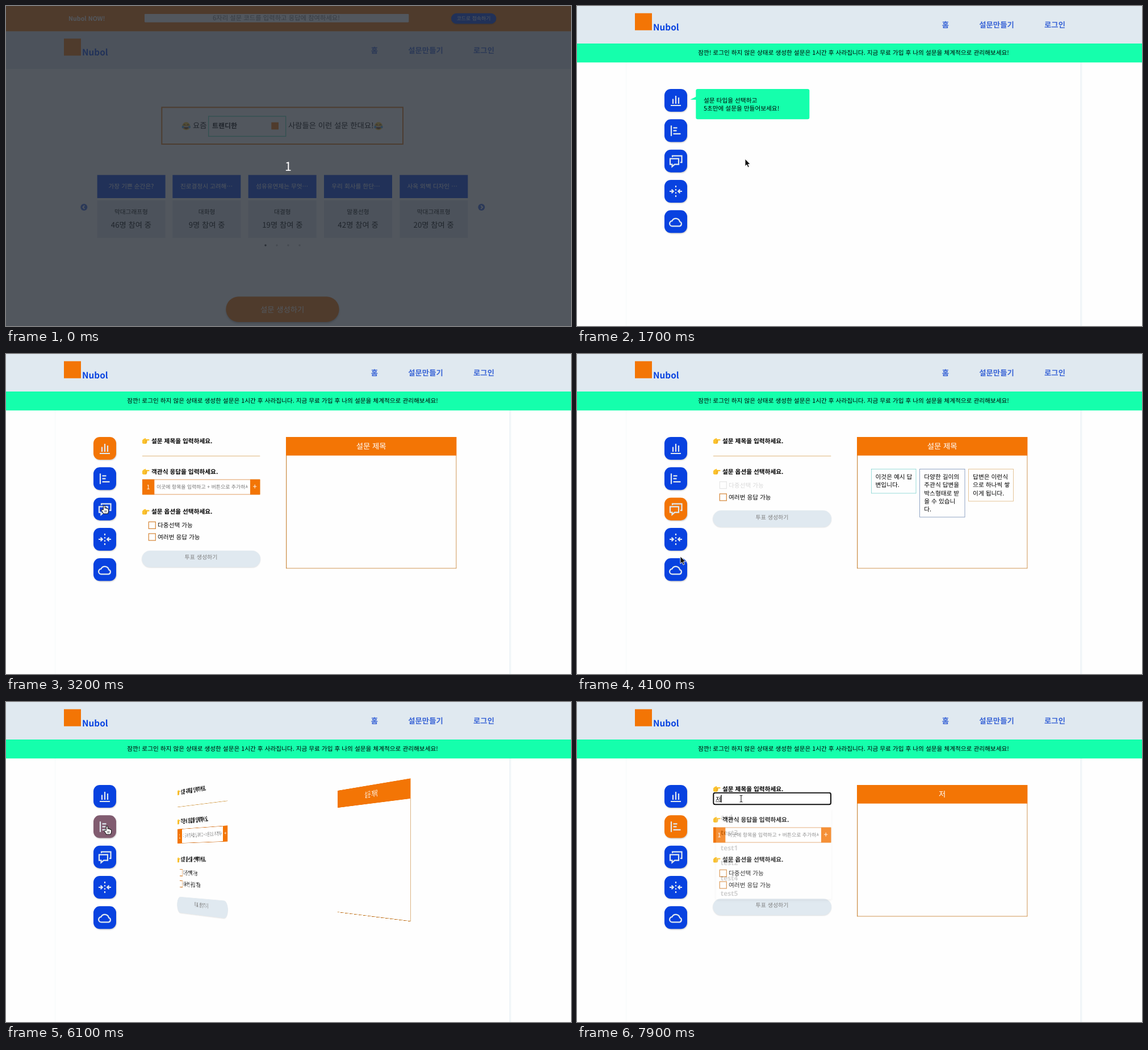
An HTML page that plays this animation: 995 by 563 pixels, repeating every 8000 ms.

```html
<!DOCTYPE html>
<html lang="ko">
<head>
<meta charset="utf-8">
<title>설문 만들기</title>
<style>
html, body { margin: 0; width: 100%; height: 100%; overflow: hidden; background: #fefefe; }
/* The page is laid out at 1.5 times the stage and scaled down, as in a scaled screen recording. */
#stage { position: relative; width: 1492.5px; height: 844.5px; overflow: hidden; background: #fefefe;
  transform: scale(.666667); transform-origin: 0 0; text-rendering: geometricPrecision;
  font-family: 'Noto Sans CJK KR', 'Noto Sans CJK', 'Noto Sans', sans-serif; color: #000; }
#stage div, #stage svg { position: absolute; box-sizing: border-box; }
#stage svg { overflow: visible; }
.t { white-space: pre; line-height: 30px; }
.page { left: 0; top: 0; width: 1492.5px; height: 844.5px; }
.flip { transform-origin: 50% 417px; backface-visibility: hidden; }
</style>
</head>
<body>
<div id="stage"></div>
<script>
const ORANGE = '#f37505', BLUE = '#0842e0', PALE = '#e0e9f0', GREEN = '#15ffac', LINE = '#b96400';
const BRAND = 'Nubol';
const K = 1.5;
const stage = document.getElementById('stage');

// Helpers take stage pixels; css strings are in layout pixels.
function box(parent, x, y, w, h, css = '') {
  const d = document.createElement('div');
  d.style.cssText = `left:${x * K}px;top:${y * K}px;width:${w * K}px;height:${h * K}px;${css}`;
  parent.appendChild(d);
  return d;
}
// Text centred vertically on cy; x is the left edge, or the middle when centred.
function text(parent, str, x, cy, size, css = '', centred = false) {
  const d = document.createElement('div');
  d.className = 't';
  d.textContent = str;
  const place = centred ? `left:${(x - 300) * K}px;width:${600 * K}px;text-align:center;` : `left:${x * K}px;`;
  d.style.cssText = `${place}top:${(cy - 10.5) * K}px;font-size:${size}px;${css}`;
  parent.appendChild(d);
  return d;
}
const mid = (p, s, x, y, size, css) => text(p, s, x, y, size, css, true);

function page(parent, css = '') {
  const d = document.createElement('div');
  d.className = 'page';
  d.style.cssText = css;
  parent.appendChild(d);
  return d;
}
function svg(parent, x, y, w, h, body) {
  const d = box(parent, x, y, w, h);
  d.innerHTML = `<svg width="${w * K}" height="${h * K}" viewBox="0 0 ${w} ${h}">${body}</svg>`;
  return d;
}
const show = (node, on) => { node.style.display = on ? '' : 'none'; };

const S = 16, M = 20;

function header(parent, y) {
  const h = box(parent, 0, y, 995, 66.6, `background:${PALE}`);
  box(h, 102, 13, 30, 30, `background:${ORANGE}`);
  text(h, BRAND, 134, 37, 23, `font-weight:700;color:${BLUE}`);
  const nav = [['홈', 649], ['설문만들기', 739], ['로그인', 841.5]];
  for (const [s, x] of nav) mid(h, s, x, 33.6, M, 'font-weight:600;color:#3a65d6');
}

const LAUGH = `<circle cx="8" cy="8" r="7" fill="#fcc832"/>
  <path d="M3 8.2H13A5 5 0 0 1 3 8.2Z" fill="#6b3a20"/><path d="M3.8 8.4H12.2V9.8H3.8Z" fill="#fff"/>
  <path d="M3.2 6.2L5.2 4.8L6.6 6.4M9.4 6.4L10.8 4.8L12.8 6.2" fill="none" stroke="#6b3a20"/>
  <ellipse cx="2.2" cy="9.6" rx="1.9" ry="2.4" fill="#4cacea"/><ellipse cx="13.8" cy="9.6" rx="1.9" ry="2.4" fill="#4cacea"/>`;
const POINT = `<path d="M0 4.5Q2 1.5 5 .8Q7 .6 6.2 2.6H12Q13.4 3.6 12 4.9H8.2Q9.4 6 8.3 7Q9 8.2 7.8 8.8Q8 10.6 6 10.6H3Q1 10.6 0 9.4Z" fill="#fbc22e"/>
  <path d="M5.4 4.9H8.2M5.6 7H8.2M5.4 8.9H7.6" stroke="#d8901c" stroke-width=".7"/>`;

// ---- Home page
const home = page(stage);
box(home, 0, 0, 995, 44.4, `background:${ORANGE}`);
text(home, BRAND + ' NOW!', 110, 21.5, S, 'font-weight:600;color:#fff');
box(home, 244, 14.2, 465, 14.8, 'background:#fff;border-radius:2px');
mid(home, '6자리 설문 코드를 입력하고 응답에 참여하세요!', 476, 21, 17, 'color:#757575');
box(home, 784, 12.5, 79, 19, `background:${BLUE};border-radius:15px;box-shadow:0 2px 3px #0004`);
mid(home, '코드로 접속하기', 823.5, 22, 13.33, 'color:#fff');
header(home, 44.4);

box(home, 273.6, 177.6, 426.4, 66.6, 'border:3px solid #e07d1c');
for (const x of [309.5, 648]) svg(home, x, 203, 16, 16, LAUGH);
text(home, '요즘', 329, 210.5, M);
box(home, 356.3, 193, 137.2, 37, 'border:2px solid #5fe3bd;background:#fff');
text(home, '트랜디한', 363, 211, 18, 'font-weight:600');
box(home, 467.5, 204.5, 12.5, 12.5, `background:${ORANGE}`);
text(home, '사람들은 이런 설문 한대요!', 497, 210.5, M);

const cards = [
  ['가장 기쁜 순간은?', '막대그래프형', 46], ['진로결정시 고려해…', '대화형', 9],
  ['섬유유연제는 무엇…', '대결형', 19], ['우리 회사를 한단…', '말풍선형', 42],
  ['사옥 외벽 디자인 …', '막대그래프형', 20]];
cards.forEach(([title, kind, n], i) => {
  const x = 160.4 + 133.2 * i;
  box(home, x, 297.2, 120, 40.8, `background:${BLUE}`);
  box(home, x, 341.8, 120, 66, `background:${PALE}`);
  if (i) text(home, title, x + 13.3, 317, S, 'color:#fff');
  else mid(home, title, x + 60, 317, S, 'color:#fff');
  mid(home, kind, x + 60, 361.5, S);
  mid(home, n + '명 참여 중', x + 60, 385, M);
});
[[137, -1], [837, 1]].forEach(([x, d]) => svg(home, x - 6, 348, 12, 12,
  `<circle cx="6" cy="6" r="6" fill="#3d68e0"/><path d="M${6 - d} 3L${6 + 2 * d} 6L${6 - d} 9" fill="none" stroke="#fff" stroke-width="1.8"/>`));
for (let i = 0; i < 4; i++)
  box(home, 455.2 + 20 * i, 419.3, 3.6, 3.6, `border-radius:50%;background:${i ? '#bdbdbd' : '#333'}`);
box(home, 387, 511.3, 199.6, 44.8, `background:${ORANGE};border-radius:34px;box-shadow:0 3px 4px #0004`);
mid(home, '설문 생성하기', 486.7, 533.5, M, 'color:#fff');

const shade = page(home, 'background:rgba(39,45,54,.8)');
mid(shade, '1', 497, 282, 32, 'color:#fff');

// ---- Maker page
const maker = page(stage);
box(maker, 87, 60, 799.5, 530, 'background:#fefefe;box-shadow:2px 0 6px #cfe0e8');
header(maker, -.4);
box(maker, 0, 66.2, 995, 33, `background:${GREEN}`);
mid(maker, '잠깐! 로그인 하지 않은 상태로 생성한 설문은 1시간 후 사라집니다. 지금 무료 가입 후 나의 설문을 체계적으로 관리해보세요!', 487, 82, S);

const glyphs = [
  'M11 29H29M15 26V17.5M20 26V12M25 26V15',
  'M12 11V29.5M15.5 15H22.5M15.5 20H21.5M15.5 25.5H28.5',
  'M12 16H25V26H18L13.5 30V26H10V16ZM14 13V11H30.5V22.5H28',
  'M20 10V13M20 16V18.5M20 21.5V24M20 27V30M9 20H15.5M12.6 16.8L15.8 20L12.6 23.2M31 20H24.5M27.4 16.8L24.2 20L27.4 23.2',
  'M14 28H26.5A4 4 0 0 0 27 20.2A7.2 7.2 0 0 0 13.4 18.8A4.6 4.6 0 0 0 14 28Z'];
const icons = glyphs.map((d, i) => {
  const b = box(maker, 154, 146 + 53.25 * i, 40, 40, 'border-radius:17px;box-shadow:1px 2px 3px #0003');
  svg(b, 0, 0, 40, 40, `<path d="${d}" fill="none" stroke="${PALE}" stroke-width="2.2"/>`);
  return b;
});

const tip = page(maker);
svg(tip, 199, 159, 11, 6, `<path d="M0 5.3L11 0V5.6Z" fill="${GREEN}"/>`);
box(tip, 209, 146, 200, 53, `background:${GREEN};border-radius:5px`);
text(tip, '설문 타입을 선택하고', 223, 165.5, S);
text(tip, '5초만에 설문을 만들어보세요!', 223, 179.7, S);

const form = box(maker, 240, 0, 207, 563);
const view = box(maker, 493.5, 0, 299.5, 563);
form.className = view.className = 'flip';

function label(parent, str, y) {
  svg(parent, 0, y - 5, 14, 11, POINT);
  text(parent, str, 16, y, S, 'font-weight:600');
}
function check(parent, str, y, off) {
  const css = off ? 'opacity:.15;' : '';
  box(parent, 10.6, y - 6.5, 13.4, 13.4, css + `border:2px solid ${off ? '#666' : '#d99048'}`);
  text(parent, str, 27, y, S, css);
}
function options(parent, y, single) {
  label(parent, '설문 옵션을 선택하세요.', y);
  check(parent, '다중선택 가능', y + 24.3, single);
  check(parent, '여러번 응답 가능', y + 45.3);
  box(parent, -1, y + 69.3, 209, 29, `background:${PALE};border-radius:22px;box-shadow:0 1px 3px #0002`);
  mid(parent, '투표 생성하기', 103.5, y + 82, 15, 'color:#808080');
}
label(form, '설문 제목을 입력하세요.', 152.3);
box(form, 0, 179, 207, 1, 'background:#cf953c');

const choice = page(form);
label(choice, '객관식 응답을 입력하세요.', 206.3);
box(choice, 0, 220.5, 207, 27, 'border:1px solid #d06a10;background:#fff');
box(choice, 0, 220.5, 21, 27, `background:${ORANGE}`);
box(choice, 190, 220.5, 17, 27, `background:${ORANGE}`);
mid(choice, '1', 10.5, 233.5, S, 'color:#fff');
mid(choice, '+', 198.3, 233, M, 'color:#fff');
const hint = box(choice, 25, 221.5, 161, 25, 'overflow:hidden');
text(hint, '이곳에 항목을 입력하고 + 버튼으로 추가하세요', 0, 12.2, 13.33, 'color:#757575');
options(choice, 276.7);

const free = page(form);
options(free, 206.3, true);

box(view, 0, 146, 299.5, 231.3, `border:1px solid ${LINE}`);
box(view, 0, 146, 299.5, 32.6, `background:${ORANGE}`);
const title = mid(view, '', 149.7, 161.5, M, 'color:#fff');
const notes = page(view);
[['이것은 예시 답|변입니다.', '#6accc8'],
 ['다양한 길이의|주관식 답변을|박스형태로 받|을 수 있습니|다.', '#5a78a8'],
 ['답변은 이런식|으로 하나씩 쌓|이게 됩니다.', '#d8a765']].forEach(([s, c], i) => {
  const lines = s.split('|'), x = 24.2 + 85.8 * i;
  box(notes, x, 202, 79.6, 15 + 14.1 * lines.length, `border:1px solid ${c}`);
  lines.forEach((l, k) => text(notes, l, x + 7.8, 216 + 14.1 * k, S));
});

// Focused title field with its suggestion list
const field = box(maker, 239, 158.8, 209, 22.4, 'background:#fff;border:3px solid #101010;border-radius:6px');
const typed = text(field, '', 3, 9.5, S, 'text-decoration:underline');
const caret = box(field, 3, 2.7, 1, 13, 'background:#000');
const list = box(maker, 244.5, 187, 203.5, 160, 'background:#fff;border-radius:4px;box-shadow:0 3px 7px #0004');
['asd', 'test3', 'test1', 'test2', 'test4', 'test5'].forEach((s, i) =>
  text(list, s, 8.5, 17 + 26.6 * i, 18, "font-family:'Noto Sans',sans-serif;font-weight:600;color:#222"));

// ---- Pointer
const shapes = {
  arrow: '<path d="M0 0V13L3 10.3L5 15L7.3 14L5.3 9.5H9.2Z" fill="#111" stroke="#fff" stroke-width=".9"/>',
  hand: '<path d="M-1.6 8V1.2Q-.2-.6 1.2 1.2V5Q3 4.2 3.6 5.6Q5.4 5 5.8 6.4Q7.6 6.2 7.6 8V11Q7 13 6.2 15H-1.4Q-2.4 12.5-5 9.5Q-5.4 7.4-3.4 8Z" fill="#fff" stroke="#111"/><path d="M1.2 9V12.5M3.4 9V12.5" stroke="#111" stroke-width=".8"/>',
  beam: '<path d="M-2.5-6Q0-6 0-4.5Q0-6 2.5-6M0-4.5V4.5M-2.5 6Q0 6 0 4.5Q0 6 2.5 6" fill="none" stroke="#222" stroke-width="1.1"/>'
};
const pointers = {};
for (const k in shapes) pointers[k] = svg(stage, 0, 0, 1, 1, shapes[k]);

const track = [
  [600, 557, 558, 'hand'], [900, 548, 542, 'hand'], [1100, 548, 542, 'hand'], [1200, 530, 520, 'arrow'],
  [1700, 296, 269, 'arrow'], [1900, 178, 168, 'hand'], [2800, 177, 165, 'hand'], [3200, 173, 266, 'hand'],
  [3800, 173, 266, 'hand'], [3900, 176, 298, 'arrow'], [4100, 182, 356, 'arrow'], [4300, 182, 365, 'hand'],
  [4400, 180, 367, 'hand'], [4500, 177, 370, 'hand'], [5000, 177, 370, 'hand'], [5100, 178, 349, 'arrow'],
  [5400, 176, 250, 'hand'], [5500, 176, 231, 'hand'], [5700, 178, 218, 'hand'], [6300, 178, 218, 'hand'],
  [6400, 214, 200, 'arrow'], [6600, 280, 173, 'beam'], [6800, 289, 170, 'beam'], [8000, 289, 170, 'beam']];

function movePointer(t) {
  let i = track.length - 1;
  while (i >= 0 && track[i][0] > t) i--;
  for (const k in pointers) show(pointers[k], i >= 0 && track[i][3] === k);
  if (i < 0) return;
  const [t0, x, y, kind] = track[i], [t1, x1, y1] = track[i + 1];
  const f = (t - t0) / (t1 - t0);
  pointers[kind].style.transform = `translate(${(x + (x1 - x) * f) * K}px,${(y + (y1 - y) * f) * K}px)`;
}

// CSS "ease" curve
function ease(p) {
  if (p <= 0) return 0;
  if (p >= 1) return 1;
  let lo = 0, hi = 1, u;
  for (let i = 0; i < 24; i++) {
    u = (lo + hi) / 2;
    const x = .75 * u * (1 - u) * (1 - u) + .75 * u * u * (1 - u) + u * u * u;
    if (x < p) lo = u; else hi = u;
  }
  return .3 * u * (1 - u) * (1 - u) + 3 * u * u * (1 - u) + u * u * u;
}
const mix = f => `rgb(${[8, 66, 224].map((c, i) => Math.round(c + ([243, 117, 5][i] - c) * f))})`;

function turn(node, k) {
  node.style.willChange = k < 1 ? 'transform' : 'auto';
  node.style.transform = k < 1 ? `perspective(2500px) rotateY(${100 * k - 100}deg)` : 'none';
}

// Shown at, animation start, selected icon
const picks = [[2000, 1950, 0], [3600, 3475, 2], [4700, 4645, 4], [6100, 6010, 1]];

function draw(t) {
  show(home, t < 1100);
  show(shade, t < 200);
  show(maker, t >= 1100);
  const pick = picks.filter(p => t >= p[0]).pop();
  show(tip, !pick);
  show(form, pick);
  show(view, pick);
  icons.forEach((b, i) => {
    b.style.background = pick && pick[2] === i ? mix(ease((t - pick[1]) / 300)) : BLUE;
  });
  if (pick) {
    const k = ease((t - pick[1]) / 400);
    turn(form, k);
    turn(view, k);
    show(choice, pick[2] < 2);
    show(free, pick[2] >= 2);
    show(notes, pick[2] === 2);
  }
  const word = t < 7700 ? '' : t < 7800 ? 'ㅈ' : '저';
  title.textContent = word || '설문 제목';
  typed.textContent = word;
  show(field, t >= 6800);
  show(caret, t < 7400 || word);
  caret.style.left = (word ? 12.5 : 3) * K + 'px';
  show(list, t >= 7000);
  list.style.opacity = t < 7700 ? 1 : .8 - (t - 7700) * .003;
  movePointer(t);
}

function frame() {
  draw(Math.floor(performance.now() % 8000 / 100) * 100);
  requestAnimationFrame(frame);
}
frame();
</script>
</body>
</html>
```
